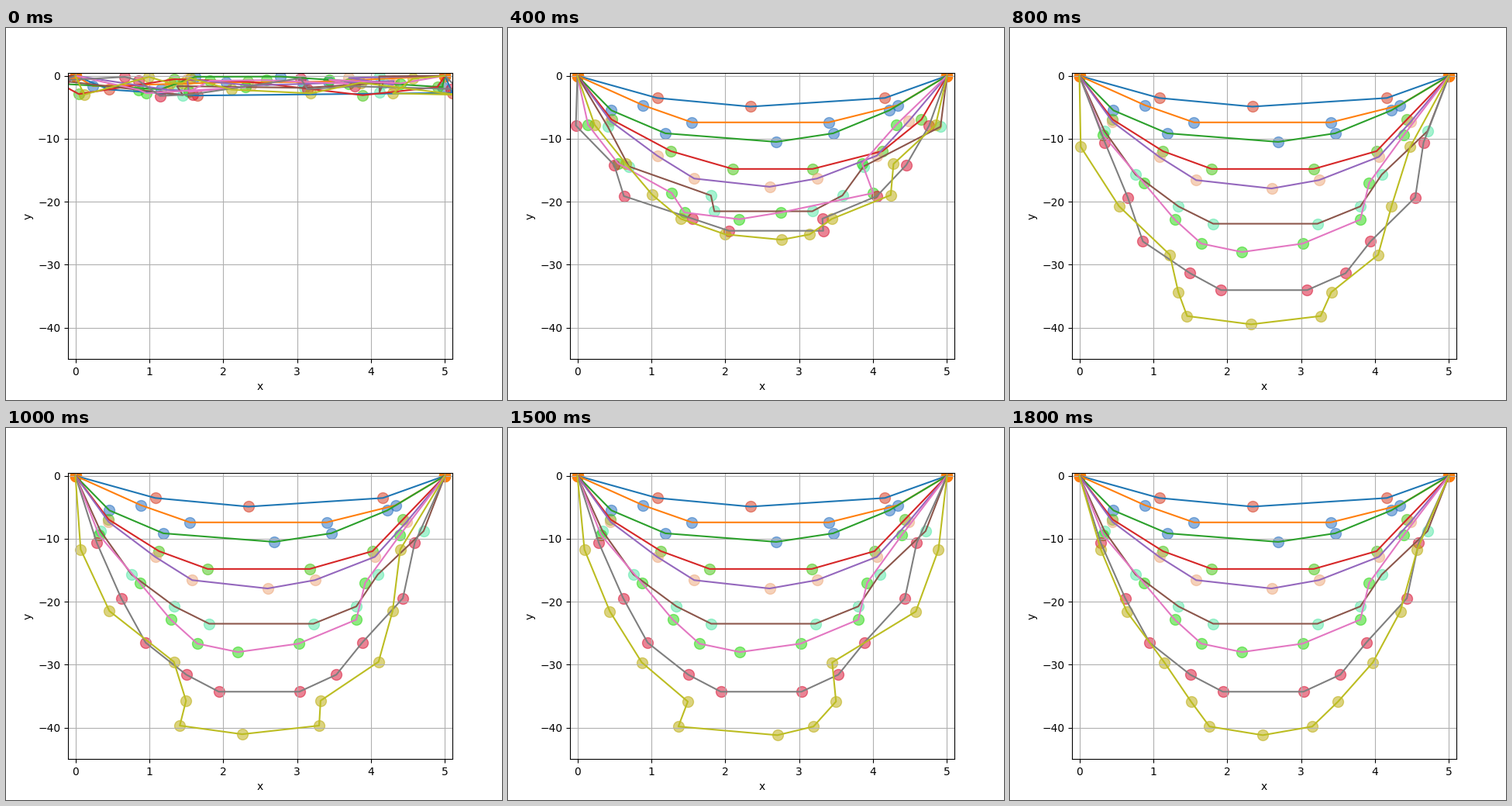
These frames come from a looping animation (640 px wide and 480 px high, 3000 ms). A matplotlib script:

```python
import numpy as np
import matplotlib.pyplot as plt
from matplotlib.animation import FuncAnimation

FRAMES, INTERVAL = 30, 100
SPAN = 5.0  # distance between the two anchors
STIFFNESS = 3.2  # how fast neighbouring nodes pull each other level

rng = np.random.default_rng(7)


class Chain:
    """Weights on a string: they start scattered, sink and settle into an arc."""

    def __init__(self, fill, sag, settle, xs):
        n = len(xs)
        self.fill = np.array(fill) / 255
        self.rest_x = np.array(xs)

        i = np.arange(1, n + 1)
        arc = i * (n + 1 - i)
        arc = arc / arc.max()
        self.rest_depth = sag * arc * (0.93 + 0.07 * arc**3)
        self.start_depth = rng.uniform(0, 3.5, n)

        # Vibration modes of the string, each fading at its own rate.
        self.modes = np.sin(np.outer(i, i) * np.pi / (n + 1)) * np.sqrt(2 / (n + 1))
        self.rates = 4 * STIFFNESS * np.sin(i * np.pi / (2 * n + 2)) ** 2

        # Sideways search that narrows and stops when the chain has settled.
        self.times = np.append(np.arange(0, settle, 3), settle)
        spread = 0.2 + 0.5 * np.exp(-self.times / 2)
        spread[-1] = 0
        self.drift = rng.normal(size=(n, len(self.times))) * spread

    def nodes(self, frame):
        x = self.rest_x + [np.interp(frame, self.times, d) for d in self.drift]
        time = frame * (1 + 0.15 * (self.rates[0] * frame) ** 3)
        fade = np.exp(-self.rates * time)
        gap = self.modes @ (fade * (self.modes @ (self.start_depth - self.rest_depth)))
        return x, -(self.rest_depth + gap)


salmon, blue = (212, 50, 25), (28, 105, 190)
lime, peach, mint = (65, 195, 10), (237, 165, 118), (78, 230, 163)
green, crimson, mustard = (30, 212, 5), (214, 8, 42), (184, 168, 0)

# fill, sag, frame of rest, node positions along the span
chains = [
    Chain(salmon, 4.9, 1, [1.08, 2.34, 4.16]),
    Chain(blue, 7.4, 1, [.89, 1.55, 3.4, 4.33]),
    Chain(blue, 10.5, 2, [.46, 1.19, 2.69, 3.46, 4.22]),
    Chain(lime, 14.8, 5, [.45, 1.13, 1.79, 3.17, 4.02, 4.43]),
    Chain(peach, 17.9, 4, [.45, 1.08, 1.58, 2.6, 3.24, 4.05, 4.48]),
    Chain(mint, 23.5, 6, [.34, .76, 1.34, 1.81, 3.22, 3.8, 4.09, 4.71]),
    Chain(green, 28, 6, [.32, .87, 1.29, 1.65, 2.2, 3.02, 3.8, 3.92, 4.39]),
    Chain(crimson, 34.3, 9,
          [.29, .62, .95, 1.5, 1.94, 3.03, 3.53, 3.88, 4.43, 4.59]),
    Chain(mustard, 41.2, 18,
          [.29, .64, 1.15, 1.51, 1.76, 2.48, 3.15, 3.5, 3.97, 4.34, 4.57]),
]

plt.rcParams["font.family"] = "DejaVu Sans"
fig, ax = plt.subplots(figsize=(6.4, 4.8), dpi=100)
ax.set(xlim=(-0.1, 5.1), ylim=(-45, 0.5), xlabel="x", ylabel="y")
ax.grid(True)


def scatter(xs, ys, color):
    return ax.scatter(xs, ys, s=100, color=[color], alpha=0.5)


lines = [ax.plot([], [])[0] for _ in chains]
dots = [scatter([], [], c.fill) for c in chains]
for _ in chains:
    scatter([0, SPAN], [0, 0], "tab:orange")


def update(frame):
    for chain, line, dot in zip(chains, lines, dots):
        x, y = chain.nodes(frame)
        line.set_data([0, *x, SPAN], [0, *y, 0])
        dot.set_offsets(np.column_stack([x, y]))
    return lines + dots


anim = FuncAnimation(fig, update, frames=FRAMES, interval=INTERVAL,
                     repeat=True, repeat_delay=0)
plt.show()
```
